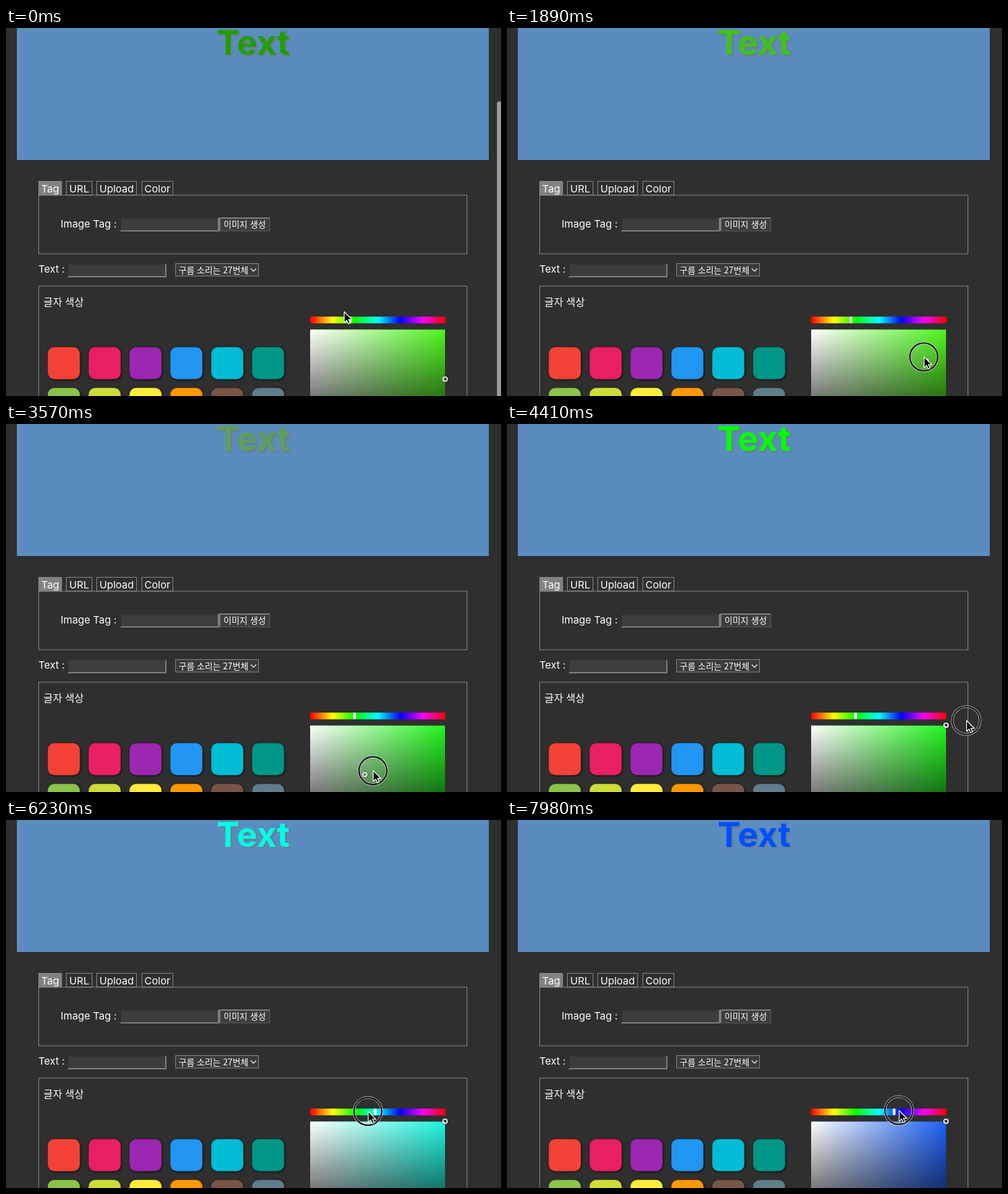
Animation, 734 px wide and 546 px high, one loop 8 s. Source, as an HTML page:

```html
<!DOCTYPE html>
<html lang="ko">
<head>
<meta charset="utf-8">
<style>
  html, body { margin: 0; width: 734px; height: 546px; overflow: hidden; background: #2f2f2f; }
  svg { display: block; }
  text { font-family: Inter, "Noto Sans CJK KR", sans-serif; font-size: 15.1px; fill: #fff; }
  .ko { font-family: "Noto Sans CJK KR", "Noto Sans CJK", sans-serif; font-size: 12.9px; }
  .mid { text-anchor: middle; }
  .line { fill: none; stroke: #858585; }
  #title { font: 700 51px Inter, sans-serif; text-shadow: 2px 2px 2px rgba(112, 122, 130, .85); }
  .swatch { stroke: rgba(0, 0, 0, .3); filter: drop-shadow(1px 1px 1.5px rgba(0, 0, 0, .6)); }
</style>
</head>
<body>
<svg width="734" height="546" viewBox="0 0 734 546">
  <defs>
    <linearGradient id="hues"></linearGradient>
    <linearGradient id="white">
      <stop stop-color="#fff"/><stop offset="1" stop-color="#fff" stop-opacity="0"/>
    </linearGradient>
    <linearGradient id="black" x2="0" y2="1">
      <stop stop-opacity="0"/><stop offset="1"/>
    </linearGradient>
  </defs>
  <rect width="734" height="546" fill="#2f2f2f"/>
  <rect x="15.5" y="-2" width="701" height="198.5" fill="#5a8cbe" stroke="#22272c"/>
  <text id="title" class="mid" x="366.5" y="39.5">Text</text>

  <g id="form"></g>
  <rect class="line" x="48.5" y="248" width="635" height="87"/>
  <text x="81" y="296">Image Tag :</text>
  <text class="ko mid" x="354" y="296">이미지 생성</text>
  <text x="48" y="363">Text :</text>
  <rect x="251.5" y="349.5" width="123" height="18.5" fill="#3b3b3b" stroke="#858585"/>
  <text class="ko" x="256" y="363.5" style="font-size:12.75px">구름 소리는 27번체</text>
  <path d="M363 357l4 4 4-4" fill="none" stroke="#fff" stroke-width="1.1"/>
  <rect class="line" x="48.5" y="383" width="635" height="200"/>
  <text class="ko" x="55.5" y="411.5" style="font-size:15.1px">글자 색상</text>
  <g id="swatches"></g>

  <rect x="451" y="428.2" width="200.5" height="10" fill="url(#hues)"/>
  <rect id="slot" y="428.2" width="4" height="9.5" rx="1" fill="#fff"/>
  <g id="square">
    <rect id="tone" x="451" y="447.5" width="200" height="190"/>
    <rect x="451" y="447.5" width="200" height="190" fill="url(#white)"/>
    <rect x="451" y="447.5" width="200" height="190" fill="url(#black)"/>
  </g>
  <g id="dot" fill="none">
    <circle r="3.6" stroke="#222" stroke-width="2.6" stroke-opacity=".6"/>
    <circle r="3.2" stroke="#fff" stroke-width="1.6"/>
  </g>
  <rect id="scroll" x="728" y="109" width="8" height="445" rx="3.5" fill="#9b9b9b"/>
  <g id="ring" fill="none">
    <circle stroke="#fff" stroke-width="3.8" stroke-opacity=".75"/>
    <circle stroke="#1c1c1c" stroke-width="2.4"/>
  </g>
  <path id="cursor" d="M.5 0V16L4.2 12.6L6.7 18L9.3 17L6.9 11.5H11.9Z" stroke="#fff" stroke-width="1.2" stroke-linejoin="round"/>
</svg>
<script>
const LOOP = 8000, STEP = 70;
const PRESS_SQUARE = 980, HUE_SNAP = 2030, RELEASE = 4410, PRESS_HUE = 5040;
const BOX = { x: 451, y: 447, w: 200, h: 190 };
const $ = id => document.getElementById(id);
const clamp = (v, a, b) => Math.min(b, Math.max(a, v));

// Pointer track: time, x, y
const TRACK = [
  [0, 501, 421], [210, 501, 421], [560, 508, 432], [980, 535, 465], [1120, 557, 482], [1190, 569, 490],
  [1540, 630, 515], [1890, 618, 488], [2310, 500, 462], [2590, 446, 472], [2660, 441, 478],
  [2900, 438, 516], [3150, 468, 536], [3500, 532, 520], [3920, 602, 474],
  [4340, 674, 442], [4410, 681, 440], [4760, 681, 440], [5110, 650, 433], [5250, 650, 433],
  [5460, 641, 433], [5530, 639, 433], [6020, 568, 432], [6860, 453, 434], [7000, 445, 434],
  [7140, 447, 434], [7910, 574, 431], [7980, 581, 431]
];

const slope = (i, k) => (TRACK[i + 1][k] - TRACK[i][k]) / (TRACK[i + 1][0] - TRACK[i][0]);

// Monotone tangent, so holds stay still
function tangent(i, k) {
  if (i === 0 || i === TRACK.length - 1) return slope(i ? i - 1 : 0, k);
  const a = slope(i - 1, k), b = slope(i, k);
  return a * b <= 0 ? 0 : 2 * a * b / (a + b);
}

function pointer(t) {
  t = clamp(t, 0, 7980);
  let i = 0;
  while (i < TRACK.length - 2 && t >= TRACK[i + 1][0]) i++;
  const p = TRACK[i], q = TRACK[i + 1], d = q[0] - p[0], u = (t - p[0]) / d;
  return [1, 2].map(k => {
    const m = tangent(i, k) * d, n = tangent(i + 1, k) * d;
    const c = q[k] - p[k];
    return p[k] + u * (m + u * (3 * c - 2 * m - n + u * (m + n - 2 * c)));
  });
}

function hsv(h, s, v) {
  const part = n => {
    const k = (n + h / 60) % 6;
    return Math.round(255 * v * (1 - s * clamp(Math.min(k, 4 - k), 0, 1)));
  };
  return `rgb(${part(5)},${part(3)},${part(1)})`;
}

// Two-tone bevelled box
function bevel(x, y, w, h, lit, shade) {
  return `<rect x="${x}" y="${y}" width="${w}" height="${h}" fill="#3d3d3d"/>
    <path d="M${x} ${y + h}V${y}H${x + w}l-2 2H${x + 2}V${y + h - 2}Z" fill="${lit}"/>
    <path d="M${x} ${y + h}H${x + w}V${y}l-2 2V${y + h - 2}H${x + 2}Z" fill="${shade}"/>`;
}

function tab([name, x, w], i) {
  return `<rect x="${x}.5" y="227.5" width="${w}" height="20.5" fill="${i ? 'none' : '#828282'}" stroke="#858585"/>
    <text class="mid" x="${x + w / 2 + .5}" y="244">${name}</text>`;
}

$('form').innerHTML =
  [['Tag', 48, 34], ['URL', 89, 38], ['Upload', 134, 59], ['Color', 201, 46]].map(tab).join('') +
  bevel(169, 281, 147, 21, '#313131', '#7c7c7c') +
  bevel(316, 281, 76, 21, '#7c7c7c', '#4a4a4a') +
  bevel(91, 349, 147, 21, '#313131', '#7c7c7c');

$('swatches').innerHTML =
  'f44336 e91e63 9c27b0 2196f3 00bcd4 009688 8bc34a cddc39 ffeb3b ff9800 795548 607d8b'
    .split(' ').map((c, i) =>
      `<rect class="swatch" x="${61.7 + i % 6 * 60.6}" y="${473.2 + Math.floor(i / 6) * 60.6}"
        width="48" height="48" rx="10" fill="#${c}"/>`).join('');

$('hues').innerHTML = [0, 1, 2, 3, 4, 5, 6]
  .map(i => `<stop offset="${i / 6}" stop-color="${hsv(i * 60, 1, 1)}"/>`).join('');

const place = (id, x, y) => $(id).setAttribute('transform', `translate(${x} ${y})`);

function hueX(t, x) {
  if (t >= PRESS_HUE) return clamp(x, BOX.x, BOX.x + BOX.w);
  return t < HUE_SNAP ? 510 : 517;
}

function dotAt(t, x, y) {
  if (t < PRESS_SQUARE) return [651, 521];
  if (t >= RELEASE) return [651, 447];
  return [clamp(x, BOX.x, BOX.x + BOX.w), clamp(y, BOX.y, BOX.y + BOX.h)];
}

function draw(time) {
  const t = Math.floor(time / STEP) * STEP;
  const [x, y] = pointer(t), [lx, ly] = pointer(t - STEP);
  const hx = hueX(t, lx), [dx, dy] = dotAt(t, lx, ly);
  const hue = (hx - BOX.x) / BOX.w * 360;

  $('slot').setAttribute('x', hx - 2);
  $('tone').setAttribute('fill', hsv(hue, .88, .96));
  $('title').style.fill = hsv(hue, (dx - BOX.x) / BOX.w, 1 - (dy - BOX.y) / BOX.h);
  place('dot', dx, dy);
  place('cursor', x, y);
  place('ring', x, y);

  const fade = clamp((t - RELEASE) / 210, 0, 1);
  const held = t >= PRESS_SQUARE && t <= RELEASE || t >= PRESS_HUE;
  const leaving = t > RELEASE && t < PRESS_HUE;
  $('ring').setAttribute('opacity', held ? 1 : leaving ? 1 - fade : 0);
  for (const c of $('ring').children) c.setAttribute('r', leaving ? 20.6 + 7 * fade : 20.6);
  $('scroll').setAttribute('opacity', clamp((840 - t) / 350, 0, 1));
}

const start = performance.now();
function tick() {
  draw((performance.now() - start) % LOOP);
  requestAnimationFrame(tick);
}
tick();
</script>
</body>
</html>
```
